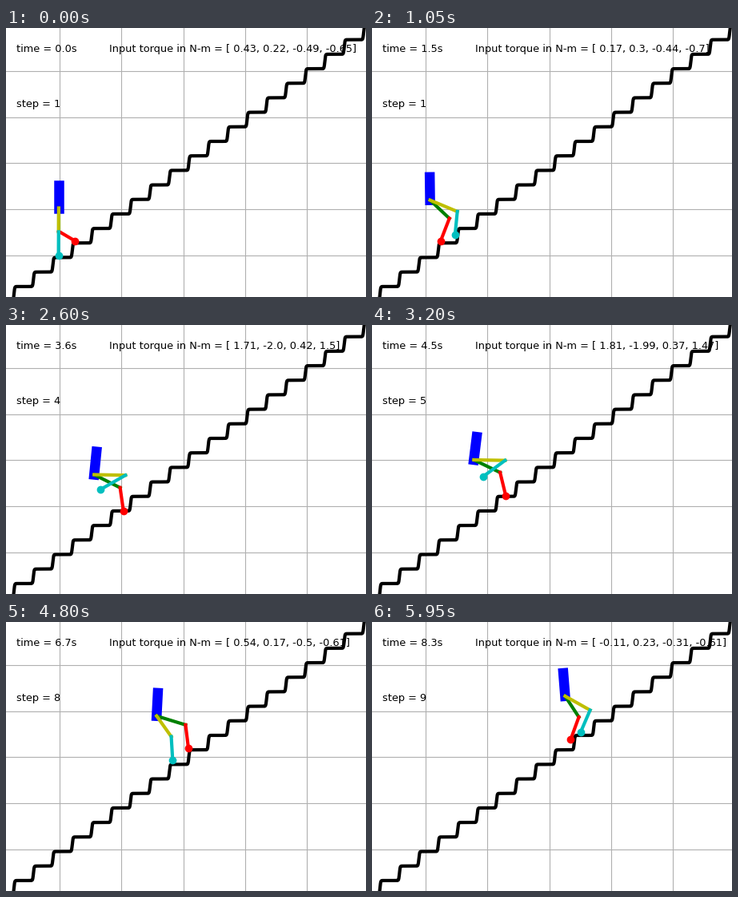
Recreate the animation shown at these times as a matplotlib script. Size 450x337 px, loop 6 s.

```python
import numpy as np
import matplotlib.pyplot as plt
from matplotlib.animation import FuncAnimation

W, H, DPI = 450, 337, 100
FRAMES, INTERVAL = 120, 50
UX, UY = 77.3, 57.75         # pixels per unit on each axis
ASPECT = UX / UY
LIMB = 29.2                  # limb length in vertical pixels
FIRST, STEP = 22, 12.3       # frames in the first step and in later ones

# Joint torques swing around a mean once per step
MEAN = np.array([0.9, -0.85, 0.0, 0.4])
SWING = np.array([1.1, -1.15, 0.5, 1.1])
DELAY = np.array([0.07, 0.19, 0.28, 0.2])


def gait(i):
    """Step number and phase within it."""
    if i < FIRST:
        return 1, i / FIRST
    done = (i - FIRST) / STEP
    return 2 + int(done), done % 1


def foothold(p):
    """Point on the climb after p steps; the stride beats against the stairs."""
    k = p - 1
    return np.array([65.6 + 20.3 * p,
                     266.5 - 14.1 * k + 10 * np.sin(2 * np.pi * k / 9)])


def reach(a, b):
    return np.hypot((b[0] - a[0]) / ASPECT, b[1] - a[1])


def knee_of(hip, foot):
    """Two-link knee position, bent forwards."""
    dist = reach(hip, foot)
    bend = np.sqrt(max(LIMB**2 - dist**2 / 4, 0)) / dist
    dx, dy = foot - hip
    return (hip + foot) / 2 + bend * np.array([dy * ASPECT, -dx / ASPECT])


def pose(i):
    n, u = gait(i)
    start = 0.8**i                     # fading effect of the upright start
    ramp = min(1, i / FIRST)**2
    sway = ramp * np.sin(2 * np.pi * u)
    stance = foothold(n)

    # The hip rocks back, then forward, but never beyond a straight leg
    hip = foothold(n + u) + (18 * start - 38 - 20 * sway, 10 * sway - 41)
    hip = stance + (hip - stance) * min(1, 2 * LIMB / reach(hip, stance))

    lift = np.sin(np.pi * u)**2
    back, ahead = foothold(n - 1), foothold(n + 1)
    swing = back + (ahead - back) * u + (-27 * lift, 11 * start - 28 * lift)

    knee = knee_of(hip, stance)
    knee += (hip + (0, LIMB) - knee) * start
    lean = ramp + 5 * sway
    top = hip + (lean, -np.sqrt((UY / 2)**2 - (lean / ASPECT)**2))
    return hip, top, knee, stance, knee_of(hip, swing), swing


def torque_text(i):
    u = gait(i)[1]
    values = MEAN + SWING * np.sin(2 * np.pi * (u - DELAY))
    return ", ".join(str(round(float(v), 2)) for v in values)


fig = plt.figure(figsize=(W / DPI, H / DPI), dpi=DPI, facecolor="white")
ax = fig.add_axes([0, 0, 1, 1])
ax.set_xlim(0, W)
ax.set_ylim(H, 0)
ax.axis("off")

for k in range(5):
    ax.axvline(67 + UX * k, color="#b0b0b0", lw=0.8, zorder=0)
    ax.axhline(53.9 + UY * k, color="#b0b0b0", lw=0.8, zorder=0)

# Stairs as a sum of steep tanh risers
RUN, RISE = 24.28, 18.19
xs = np.linspace(-5, W + 5, 4000)
risers = 10 + RUN * np.arange(20)
climb = (1 + np.tanh((xs[:, None] - risers) / 0.9)).sum(axis=1) / 2
ax.plot(xs, 323.9 + RISE - RISE * climb, color="black", lw=3, zorder=1)


def limb(color, z, width=3, foot=False):
    style = dict(marker="o", ms=6, markevery=[1]) if foot else {}
    return ax.plot([], [], color=color, lw=width, zorder=z,
                   solid_capstyle="projecting", **style)[0]


def label(x, y):
    return ax.text(x, y, "", fontsize=9.32, family="DejaVu Sans",
                   va="baseline", zorder=9)


torso = limb("b", 2, width=9)
thigh_a, shin_a = limb("g", 3), limb("r", 4, foot=True)
thigh_b, shin_b = limb("y", 5), limb("c", 6, foot=True)
clock, counter, torque = label(12.6, 30.4), label(12.6, 99.3), label(129, 30.4)


def join(line, p, q):
    line.set_data([p[0], q[0]], [p[1], q[1]])


def draw(i):
    hip, top, knee_a, stance, knee_b, swing = pose(i)
    join(torso, hip, top)
    join(thigh_a, hip, knee_a)
    join(shin_a, knee_a, stance)
    join(thigh_b, hip, knee_b)
    join(shin_b, knee_b, swing)

    clock.set_text(f"time = {0.07 * i:.1f}s")
    counter.set_text(f"step = {gait(i)[0]}")
    torque.set_text(f"Input torque in N-m = [ {torque_text(i)}]")
    return torso, thigh_a, shin_a, thigh_b, shin_b, clock, counter, torque


anim = FuncAnimation(fig, draw, frames=FRAMES, interval=INTERVAL,
                     repeat=True, repeat_delay=0, blit=False)
plt.show()
```
